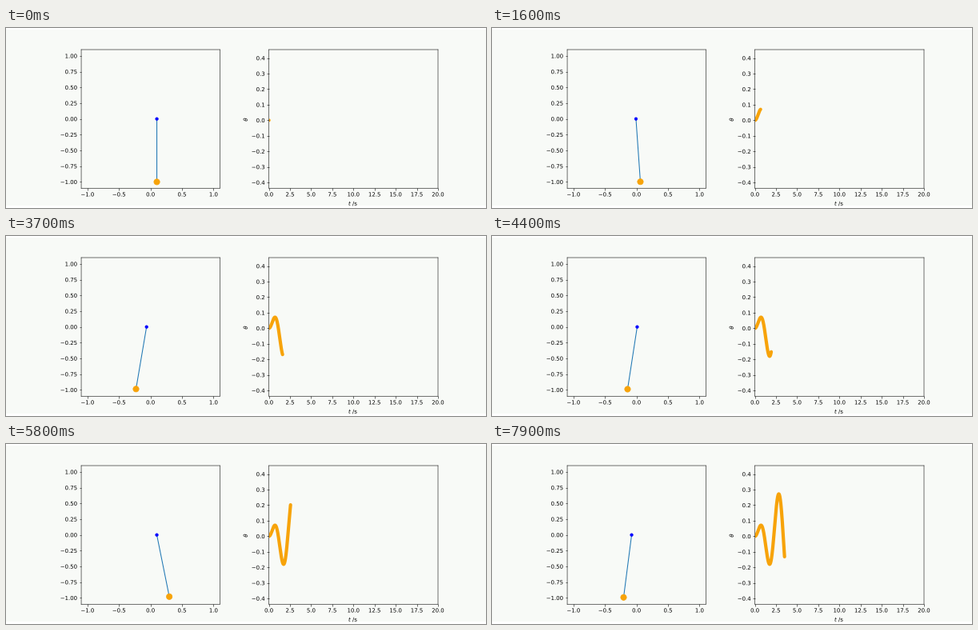
Write a matplotlib script that moves like this. It is 600 px wide and 225 px high and loops after 8000 ms.

```python
import numpy as np
import matplotlib.pyplot as plt
from matplotlib import patheffects
from matplotlib.animation import FuncAnimation
from matplotlib.patches import Rectangle

G, LENGTH = 9.8, 1.0
AMP, OMEGA = 0.1, 2.5       # pivot motion: AMP * cos(OMEGA * t)
FRAMES, INTERVAL = 80, 100
DT, SUB, DELAY = 0.005, 9, 11   # sample time, samples per frame, samples of rest
PAPER, ORANGE = "#f8faf7", "#f7a30a"

# Draw lines, dots and text at fractional pixel positions.
plt.rcParams.update({"path.snap": False, "text.hinting": "none",
                     "path.effects": [patheffects.Normal()]})


def slope(t, state):
    theta, rate = state
    push = AMP * OMEGA**2 * np.cos(OMEGA * t)
    return np.array([rate, (push * np.cos(theta) - G * np.sin(theta)) / LENGTH])


def solve(times, h):
    """Integrate the driven pendulum from rest with RK4."""
    state = np.zeros(2)
    angles = [0.0]
    for t in times[:-1]:
        k1 = slope(t, state)
        k2 = slope(t + h / 2, state + h / 2 * k1)
        k3 = slope(t + h / 2, state + h / 2 * k2)
        k4 = slope(t + h, state + h * k3)
        state = state + h / 6 * (k1 + 2 * k2 + 2 * k3 + k4)
        angles.append(state[0])
    return np.array(angles)


times = np.arange(FRAMES * SUB) * DT
angles = solve(times, DT)

fig, (left, right) = plt.subplots(1, 2, figsize=(12, 4.5), dpi=50, facecolor=PAPER)
for y, height in ((0, 3), (223, 2)):
    fig.add_artist(Rectangle((0, y / 225), 1, height / 225, color="white", lw=0, zorder=-1))

left.set(facecolor=PAPER, aspect="equal", xlim=(-1.1, 1.1), ylim=(-1.1, 1.1))
right.set(facecolor=PAPER, xlim=(0, 20), ylim=(-0.437, 0.4545),
          xlabel=r"$t$ /s", ylabel=r"$\theta$")

rod, = left.plot([], [])
pivot, = left.plot([], [], "o", color="blue", ms=5)
bob, = left.plot([], [], "o", color=ORANGE, ms=10.5)
trace, = right.plot([], [], color=ORANGE, lw=6,
                    solid_capstyle="round", solid_joinstyle="round")


def draw(i):
    n = max(i * SUB - DELAY, 0)
    x = AMP * np.cos(OMEGA * times[n])
    bx = x + LENGTH * np.sin(angles[n])
    by = -LENGTH * np.cos(angles[n])
    rod.set_data([x, bx], [0, by])
    pivot.set_data([x], [0])
    bob.set_data([bx], [by])
    trace.set_data(times[:n + 2], angles[:n + 2])
    return rod, pivot, bob, trace


anim = FuncAnimation(fig, draw, frames=FRAMES, interval=INTERVAL,
                     repeat=True, repeat_delay=0, blit=False)
plt.show()
```
